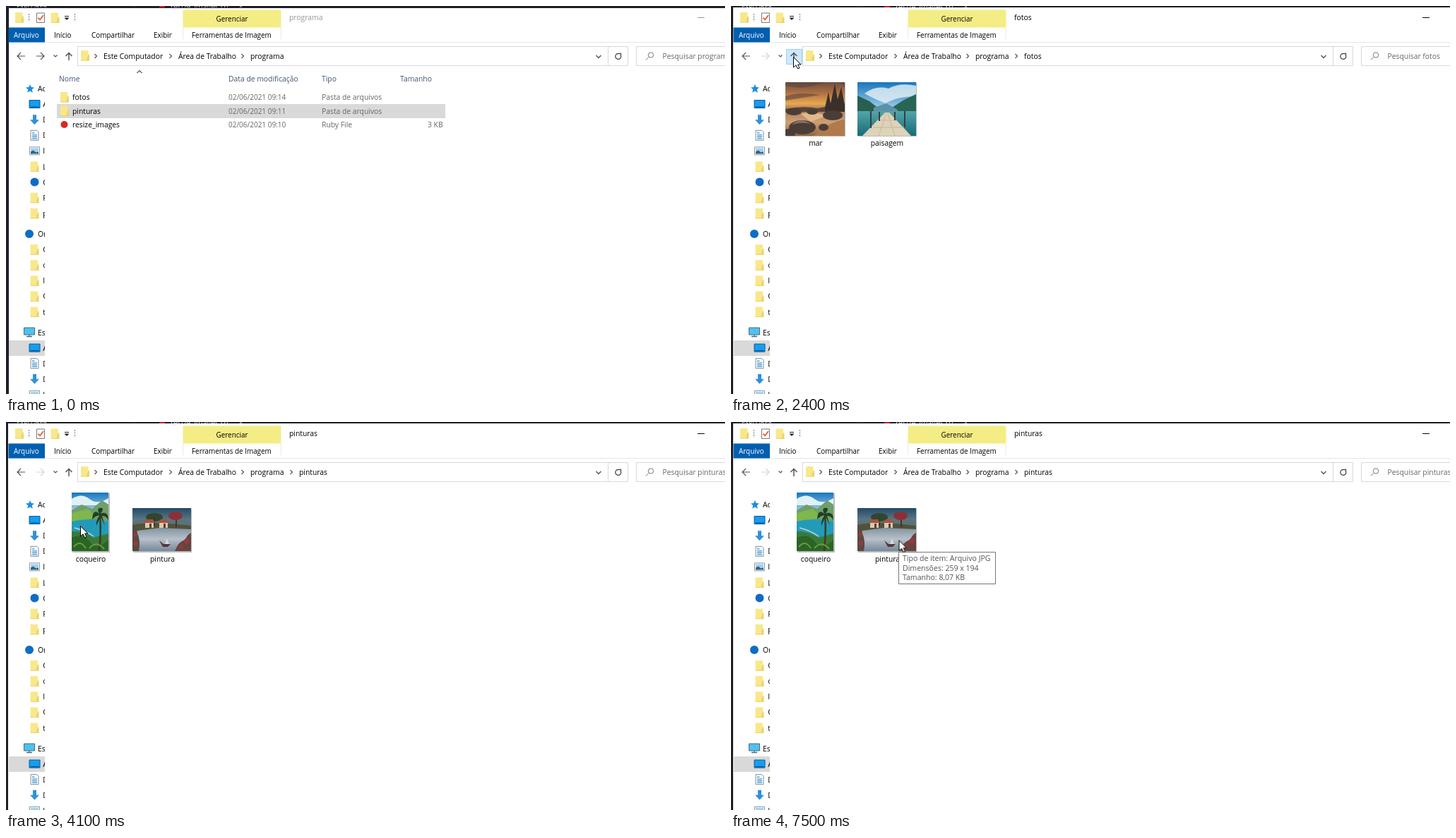
An HTML page for the animation above (8 s loop, 1018x550 px).

```html
<!DOCTYPE html>
<html lang="pt-BR">
<head>
<meta charset="utf-8">
<title>Explorador de arquivos</title>
<style>
html, body { margin: 0; width: 100%; height: 100%; overflow: hidden; background: #1f2027; }
#stage { display: block; width: 1018px; height: 550px; }
text { font: 10.35px "Open Sans", "Noto Sans", sans-serif; fill: #000; white-space: pre; }
.tab { font-size: 9.9px; }
.date { font-size: 10px; }
.dim { fill: #666; }
.note { font-size: 10.55px; fill: #555; }
.head { fill: #43566f; }
.off { fill: #969696; }
.code { font-size: 10.5px; fill: #d0d0d0; }
.mid { text-anchor: middle; }
.line { fill: none; stroke: #555; stroke-width: 1.2; }
.box { fill: #fff; stroke: #d9d9d9; }
.sel { fill: #cce8ff; stroke: #99d1ff; }

/* One loop is 8 s, so 1.25% is one 100 ms step. */
.anim { animation: 8s step-end -5ms infinite; }
.idle { animation-name: idle; }
.active { animation-name: active; }
.fwd { animation-name: fwd; }
.root { animation-name: root; }
.photos { animation-name: photos; }
.photoFiles { animation-name: photoFiles; }
.paintings { animation-name: paintings; }
.greyRow { animation-name: greyRow; }
.firstRow { animation-name: firstRow; }
.secondRow { animation-name: secondRow; }
.upHover { animation-name: upHover; }
.trail { animation-name: trail; }
.tip { animation-name: tip; }
.cursor { animation-name: cursor; }
@keyframes idle { 0% { opacity: 1 } 12.5%, 100% { opacity: 0 } }
@keyframes active { 0% { opacity: 0 } 12.5%, 100% { opacity: 1 } }
@keyframes fwd { 0% { stroke: #555 } 13.75%, 100% { stroke: #d5d5d5 } }
@keyframes root { 0%, 32.5% { opacity: 1 } 13.75%, 51.25%, 100% { opacity: 0 } }
@keyframes photos { 0%, 32.5%, 100% { opacity: 0 } 13.75% { opacity: 1 } }
@keyframes photoFiles { 0%, 32.5%, 100% { opacity: 0 } 15% { opacity: 1 } }
@keyframes paintings { 0% { opacity: 0 } 51.25%, 100% { opacity: 1 } }
@keyframes greyRow { 0% { opacity: 1 } 11.25%, 100% { opacity: 0 } }
@keyframes firstRow { 0%, 48.75%, 100% { opacity: 0 } 11.25% { opacity: 1 } }
@keyframes secondRow { 0%, 51.25%, 100% { opacity: 0 } 48.75% { opacity: 1 } }
@keyframes upHover { 0%, 38.75%, 100% { opacity: 0 } 28.75% { opacity: 1 } }
@keyframes trail { 0% { opacity: 0 } 43.75%, 100% { opacity: 1 } }
@keyframes tip { 0% { opacity: 0 } 93.75%, 100% { opacity: 1 } }
@keyframes cursor {
  0% { transform: translate(1100px, 600px) }
  2.5% { transform: translate(560px, 500px); animation-timing-function: steps(3) }
  6.25% { transform: translate(180px, 190px); animation-timing-function: steps(4) }
  11.25% { transform: translate(109px, 132px) }
  20% { transform: translate(111px, 125px); animation-timing-function: steps(8) }
  30% { transform: translate(88px, 72px) }
  37.5% { transform: translate(88px, 72px); animation-timing-function: steps(4) }
  42.5% { transform: translate(103px, 132px); animation-timing-function: steps(3) }
  46.25% { transform: translate(105px, 147px) }
  55% { transform: translate(105px, 147px); animation-timing-function: steps(4) }
  60% { transform: translate(116px, 155px) }
  66.25% { transform: translate(116px, 156px) }
  73.75% { transform: translate(172px, 172px) }
  75% { transform: translate(232px, 185px) }
  80% { transform: translate(232px, 185px); animation-timing-function: steps(4) }
  85%, 100% { transform: translate(237.5px, 167.5px) }
}
</style>
</head>
<body>
<svg id="stage" viewBox="0 0 1018 550" xmlns="http://www.w3.org/2000/svg">
  <defs>
    <g id="folder">
      <path d="M-6-7H4.500V7.500H-6Z" fill="#f8e88c"/>
      <path d="M4-1H6V7.500H2.500V2H4Z" fill="#ecd468"/>
      <path d="M-6 7H6" stroke="#ead170"/>
    </g>
    <g id="star"><path d="M0-6 1.800-2 6-1.600 2.800 1.300 3.800 5.700 0 3.400-3.800 5.700-2.800 1.300-6-1.600-1.800-2Z" fill="#1b8fe0"/></g>
    <g id="screen"><path d="M-7.500-5.500H7.500V5.500H-7.500Z" fill="#169df0" stroke="#075b96"/><path d="M-6 4H6" stroke="#0a416c"/></g>
    <g id="down"><path d="M-2.500-7H2.500V0H6.500L0 7-6.500 0H-2.500Z" fill="#3191dc"/></g>
    <g id="doc">
      <path d="M-5.500-7H3L5.500-4.500V7H-5.500Z" fill="#fff" stroke="#7d8b96"/>
      <path d="M-3.500-3.500H0M-3.500-.5H3.500M-3.500 2H3.500M-3.500 4.500H3.500" stroke="#2d8cd0" stroke-width="1.300"/>
    </g>
    <g id="picture">
      <path d="M-7-5.500H7V5.500H-7Z" fill="#fff" stroke="#8a969f"/>
      <path d="M-5.500-4H5.500V4H-5.500Z" fill="#9fd2f4"/><path d="M-5.500 4V1L-2-1 2 2 5.500 1V4Z" fill="#35617c"/>
    </g>
    <circle id="cloud" r="6" fill="#0f6cc4"/>
    <g id="pc">
      <path d="M-7.500-6.500H7.500V3.500H-7.500Z" fill="#4cc2f1" stroke="#4c6a7d"/>
      <path d="M-4 6H4M0 4V6" stroke="#4c6a7d" stroke-width="1.500"/>
    </g>
    <path id="chevron" d="M-1.500-3 1.500 0-1.500 3" class="line"/>
    <clipPath id="sideClip"><path d="M3 85H55V550H3Z"/></clipPath>
    <clipPath id="topClip"><path d="M0 0H1018V3H0Z"/></clipPath>
    <linearGradient id="sunset" x2="0" y2="1">
      <stop stop-color="#6b5044"/><stop offset=".2" stop-color="#b06f42"/>
      <stop offset=".4" stop-color="#e8a850"/><stop offset=".5" stop-color="#a87a5c"/>
      <stop offset=".75" stop-color="#cf9f74"/><stop offset="1" stop-color="#8f643f"/>
    </linearGradient>
    <linearGradient id="sky" x2="0" y2="1"><stop stop-color="#1976bd"/><stop offset="1" stop-color="#b5dcef"/></linearGradient>
    <linearGradient id="lake" x2="0" y2="1"><stop stop-color="#53a5a8"/><stop offset="1" stop-color="#176b78"/></linearGradient>
    <linearGradient id="river" x2="0" y2="1"><stop stop-color="#7b929f"/><stop offset=".5" stop-color="#b8bfc9"/><stop offset="1" stop-color="#74899b"/></linearGradient>
    <linearGradient id="dusk" x2="0" y2="1"><stop stop-color="#234b68"/><stop offset="1" stop-color="#84949a"/></linearGradient>
  </defs>

  <g clip-path="url(#topClip)">
    <text class="code" x="15" y="4" style="font-size:9px">EXPLORER</text>
    <text class="code" x="177" y="3">···</text>
    <circle cx="221" cy="0" r="4" fill="#c4232b"/>
    <text class="code" x="233" y="5">resize_images.rb</text>
    <path d="M329-3 336 4M336-3 329 4" stroke="#ddd"/>
  </g>
  <path d="M3 2H1018V550H3Z" fill="#fff"/>
  <path class="anim idle" d="M3.500 550V2.500H1018" fill="none" stroke="#1f2027"/>

  <!-- Title bar and ribbon -->
  <use href="#folder" x="19" y="16"/>
  <use href="#folder" x="69.500" y="16.500"/>
  <path d="M32.500 11V22M97.500 11V22" stroke="#777" stroke-dasharray="2 1.500"/>
  <path d="M43.500 10H54.500V23.500H43.500Z" fill="#fff" stroke="#777"/>
  <path d="M45.500 16.500 48 19.500 53 13" fill="none" stroke="#e0552a" stroke-width="1.700"/>
  <path d="M83 14.500H89" stroke="#222"/><path d="M82.500 16.500H89.500L86 20Z" fill="#222"/>
  <path d="M250.500 5.500H389.500V30.500H250.500Z" fill="#f4ed85"/>
  <path d="M250.500 31V47M389 31V47" stroke="#e8e8e8"/>
  <path d="M55 51.500H1018" stroke="#e4e4e4"/>
  <path d="M3.500 30.500H55V51.500H3.500Z" fill="#005fb0"/>
  <g class="anim idle"><text class="off" x="401" y="20">programa</text><path d="M979 16.500H989" stroke="#999"/></g>
  <g class="anim active"><path d="M979 16.500H989" stroke="#000"/></g>

  <!-- Navigation bar -->
  <path class="line" d="M27 71H16M21 66 16 71 21 76"/>
  <path class="line anim fwd" d="M43 71H54M49 66 54 71 49 76"/>
  <path class="line" d="M67.500 69.500 70 72 72.500 69.500"/>
  <path class="sel anim upHover" d="M78.500 61.500H100.500V82.500H78.500Z"/>
  <path class="line" d="M89 77V66M84.500 71 89 66.500 93.500 71" style="stroke-width:1.500"/>
  <path class="box" d="M101.500 57.500H880.500V84.500H101.500ZM852.500 57.500V84.500"/>
  <path class="box" d="M1020 57.500H892.500V84.500H1020"/>
  <use href="#folder" x="112" y="70"/>
  <path class="line" d="M835.500 70 839 73.500 842.500 70" style="stroke-width:1.500"/>
  <path class="line" d="M870 69A4 4 0 1 1 866 67.500H870.500M870.500 66.500V70.500" style="stroke-width:1.400"/>
  <g class="line" style="stroke:#777;stroke-width:1"><circle cx="913" cy="69.500" r="3.700"/><path d="M910 72.500 906 76.500"/></g>
  <use href="#chevron" x="127" y="71"/><use href="#chevron" x="233" y="71"/><use href="#chevron" x="335" y="71"/>

  <g id="labels"></g>
  <g id="side" clip-path="url(#sideClip)"></g>

  <!-- Program folder -->
  <g class="anim root">
    <path d="M72 139H622V159H72Z" fill="#d9d9d9" class="anim greyRow"/>
    <path class="sel anim firstRow" d="M72.500 120.500H621.500V139.500H72.500Z"/>
    <path class="sel anim secondRow" d="M72.500 139.500H621.500V158.500H72.500Z"/>
    <path class="line" d="M185.500 95 189 91.500 192.500 95"/>
    <use href="#chevron" x="404" y="71" class="anim trail"/>
    <text class="anim active" x="401" y="20">programa</text>
    <g id="list"></g>
  </g>

  <g class="anim photos" id="photosBar"></g>
  <g class="anim photoFiles">
    <path d="M78 109H162V185H78ZM180 109H263V185H180Z" fill="#bbb"/>
    <svg x="77" y="108" width="84" height="76">
      <path d="M0 0H84V76H0Z" fill="url(#sunset)"/>
      <path d="M0 4Q20 12 48 3T84 8V0H0ZM0 20Q20 13 50 18Q24 22 0 26Z" fill="#5a463f" opacity=".6"/>
      <path d="M0 38Q24 33 46 37L84 30V42H0Z" fill="#5b433a"/>
      <path d="M56 36 61 14 64 30 70 2 74 24 79 7 84 32V42H56Z" fill="#3b3029"/>
      <path d="M22 45Q42 40 58 48L36 56Z" fill="#e3b98b"/>
      <path d="M40 76Q62 56 84 53V76Z" fill="#b07a4a"/>
      <g fill="#4a3d38">
        <ellipse cx="12" cy="42" rx="11" ry="5"/><ellipse cx="38" cy="42" rx="8" ry="4"/>
        <ellipse cx="67" cy="47" rx="14" ry="7"/><ellipse cx="24" cy="64" rx="19" ry="10"/>
        <ellipse cx="54" cy="64" rx="7" ry="5"/><ellipse cx="5" cy="73" rx="9" ry="7"/>
      </g>
      <path d="M9 60Q22 49 36 59Q23 56 9 60Z" fill="#84716a"/>
    </svg>
    <svg x="179" y="108" width="83" height="76">
      <path d="M0 0H83V44H0Z" fill="url(#sky)"/>
      <path d="M10 16Q26 4 44 9Q60 0 83 5V20Q56 20 40 30Q20 22 10 16Z" fill="#e8f2f5" opacity=".8"/>
      <path d="M0 19 17 27 35 41H0Z" fill="#285f51"/><path d="M41 41 66 25 83 17V43Z" fill="#276654"/>
      <path d="M23 36 41 30 57 39V43H23Z" fill="#5e91a7"/>
      <path d="M0 41H83V76H0Z" fill="url(#lake)"/>
      <path d="M39 43H45L76 76H7Z" fill="#ded2b9"/>
      <path d="M41 44 30 76M43 44 53 76M31 54H55M22 64H66" stroke="#c4b79c" fill="none"/>
      <path d="M19 41V65M31 42V55M53 42V54M67 41V64" stroke="#343f43" stroke-width="2"/>
    </svg>
    <text class="mid" x="120" y="198">mar</text><text class="mid" x="221" y="198">paisagem</text>
  </g>

  <!-- Paintings folder -->
  <g class="anim paintings">
    <g id="paintingsBar"></g>
    <path d="M94 101H147V185H94ZM180 123H263V185H180Z" fill="#bbb"/>
    <svg x="93" y="100" width="52" height="83">
      <path d="M0 0H52V30H0Z" fill="url(#sky)"/>
      <path d="M0 9Q14 0 25 9T52 8V18H0Z" fill="#e1f0f4"/>
      <path d="M0 25 14 17 29 23 43 11 52 17V44H0Z" fill="#6f9f6a"/>
      <path d="M0 29 23 23 35 35 19 40 0 42Z" fill="#7fb64d"/>
      <path d="M0 41Q24 35 52 41V73H0Z" fill="#229bb9"/>
      <path d="M0 55Q17 55 31 64L52 58V83H0Z" fill="#3b7936"/>
      <path d="M4 50Q20 54 31 62" fill="none" stroke="#d5d0bd" stroke-width="1.500"/>
      <path d="M0 64Q17 57 26 70T52 67V83H0Z" fill="#2b6427"/>
      <path d="M40 31Q42 54 39 83" fill="none" stroke="#393d26" stroke-width="2.500"/>
      <path d="M40 31Q30 21 29 38Q35 32 40 32Q34 39 35 47L41 34 47 47 43 33Q50 33 52 40Q52 25 41 30Q48 20 39 22Q35 24 40 31Z" fill="#203f25"/>
      <path d="M3 77Q12 66 20 79M25 79Q35 67 46 80" fill="none" stroke="#6b9a38" stroke-width="2"/>
    </svg>
    <svg x="179" y="122" width="83" height="61">
      <path d="M0 0H83V28H0Z" fill="url(#dusk)"/>
      <path d="M0 19 22 12 44 20 65 13 83 18V30H0Z" fill="#5a737a"/>
      <path d="M0 27H83V61H0Z" fill="url(#river)"/>
      <path d="M0 24Q23 18 83 25V30L38 28 0 33Z" fill="#52513a"/>
      <ellipse cx="31" cy="13" rx="12" ry="6" fill="#30472d"/><path d="M31 13V25M62 13V27" stroke="#443329" stroke-width="2"/>
      <ellipse cx="61" cy="11" rx="10" ry="6" fill="#8d3036"/>
      <g id="house"><path d="M18 20H30V28H18Z" fill="#dbc8ae"/><path d="M16 21 20 16H29L32 21Z" fill="#a55340"/><path d="M24 22H27V28H24Z" fill="#574037"/></g>
      <use href="#house" x="20"/>
      <path d="M0 25Q7 28 7 36Q12 46 9 61H0Z" fill="#584a40"/>
      <path d="M83 35Q77 38 75 45Q66 46 60 61H83Z" fill="#66443f"/>
      <g fill="#8f3b40"><circle cx="4" cy="38" r="3"/><circle cx="5" cy="50" r="3.500"/><circle cx="77" cy="47" r="4"/><circle cx="69" cy="55" r="3"/></g>
      <path d="M38 46 44 51H54L50 55H43Z" fill="#56363a"/><path d="M46 51 49 43 52 51Z" fill="#d8d8d4"/>
    </svg>
    <text class="mid" x="120" y="198">coqueiro</text><text class="mid" x="221.500" y="198">pintura</text>
  </g>

  <g class="anim tip">
    <path d="M237.500 184.500H374.500V229.500H237.500Z" fill="#fff" stroke="#767676"/>
    <g id="tipText"></g>
  </g>
  <path class="anim cursor" d="M.5.500V15L4 11.800 6.500 17 9 16 6.700 11H11Z" fill="#fff" stroke="#000"/>
</svg>
<script>
const $ = id => document.getElementById(id);
const text = (x, y, s, cls = "") => `<text x="${x}" y="${y}" class="${cls}">${s}</text>`;
const icon = (id, x, y) => `<use href="#${id}" x="${x}" y="${y}"/>`;

const tabs = [[68, "Início"], [121, "Compartilhar"], [209, "Exibir"], [263, "Ferramentas de Imagem"]];
$("labels").innerHTML =
  `<text x="11" y="45" class="tab" style="fill:#fff">Arquivo</text>` +
  text(320, 22, "Gerenciar", "tab mid") +
  tabs.map(([x, s]) => text(x, 45, s, "tab")).join("") +
  text(138, 75, "Este Computador") + text(244, 75, "Área de Trabalho") + text(346, 75, "programa");

// Each section: first centre line, then icon and label; the first entry is the parent.
const sections = [
  [117, "star Acesso", "screen Área", "down Down", "doc Doc", "picture Imag", "folder L",
    "cloud C", "folder F", "folder p"],
  [323, "cloud On", "folder C", "folder c", "folder I", "folder C", "folder t"],
  [462.5, "pc Este", "screen Área", "doc Doc", "down Down", "picture Imag"]
];
$("side").innerHTML = `<path d="M4 474H56V496H4Z" fill="#d9d9d9"/>` +
  sections.map(([top, ...items]) => items.map((item, i) => {
    const [id, label] = item.split(" "), y = top + i * 22.1;
    return icon(id, i ? 40.5 : id === "star" ? 34 : 33, y) + text(i ? 52.3 : 45, y + 4, label);
  }).join("")).join("");

const columns = [[75, "Nome"], [315, "Data de modificação"], [447, "Tipo"], [558, "Tamanho"]];
const rows = [["fotos", "09:14"], ["pinturas", "09:11"], ["resize_images", "09:10"]];
$("list").innerHTML = columns.map(([x, s]) => text(x, 107, s, "head")).join("") +
  rows.map(([name, time], i) => {
    const y = 129 + i * 19.5, file = i === 2;
    return (file ? `<circle cx="82.500" cy="${y}" r="5" fill="#d8281f"/>` : icon("folder", 83, y)) +
      text(94, y + 4, name) + text(315, y + 4, "02/06/2021 " + time, "date dim") +
      text(447, y + 4, file ? "Ruby File" : "Pasta de arquivos", "dim") +
      (file ? text(597, y + 4, "3 KB", "dim") : "");
  }).join("") + text(929.5, 75, "Pesquisar programa", "dim");

const bar = name => text(401, 20, name) + icon("chevron", 404, 71) + text(415, 75, name) +
  text(929.5, 75, "Pesquisar " + name, "dim");
$("photosBar").innerHTML = bar("fotos");
$("paintingsBar").innerHTML = bar("pinturas");
$("tipText").innerHTML = ["Tipo de item: Arquivo JPG", "Dimensões: 259 x 194", "Tamanho: 8,07 KB"]
  .map((s, i) => text(243, 197 + i * 13.7, s, "note")).join("");
</script>
</body>
</html>
```
